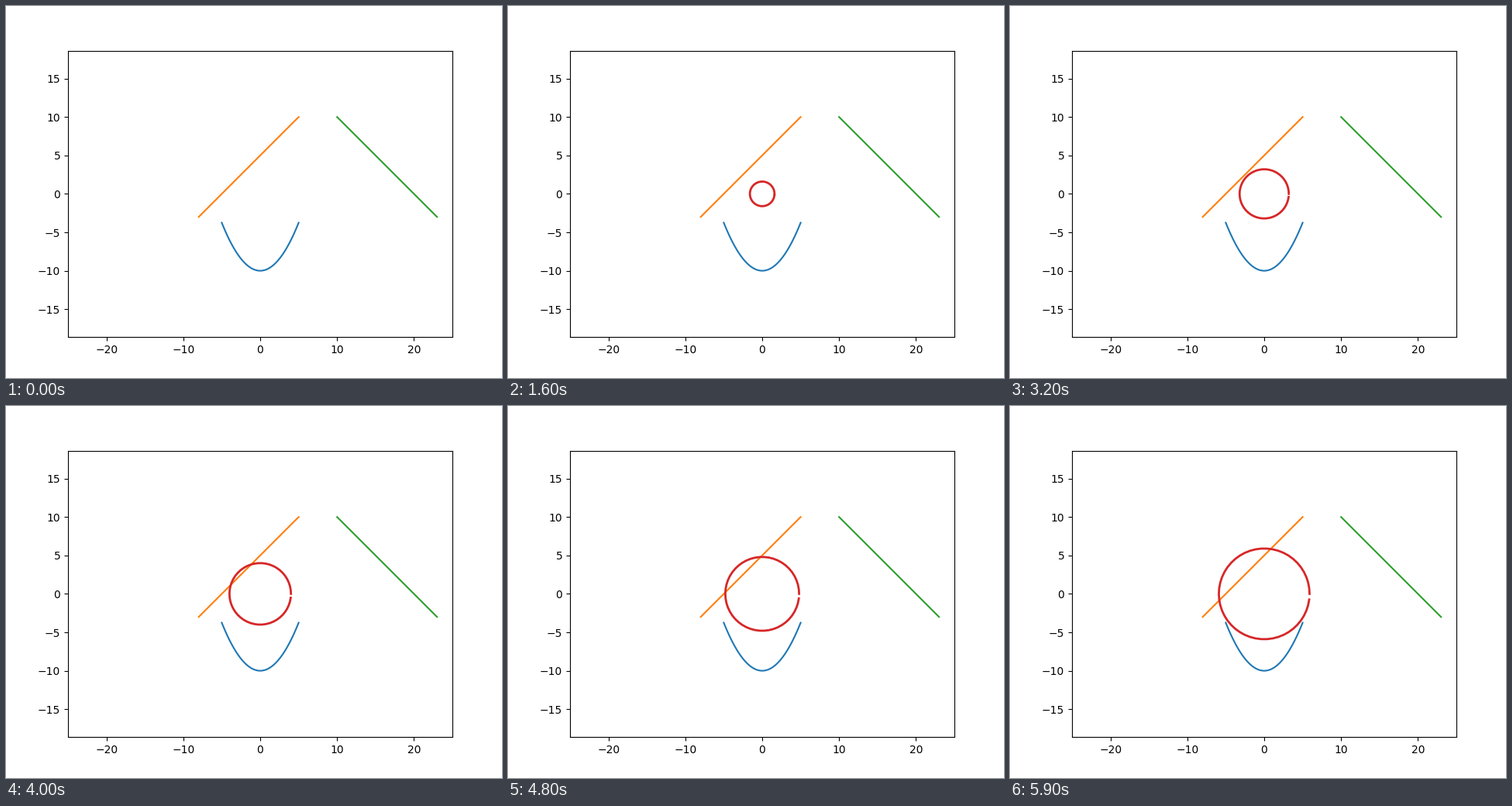
A matplotlib script for the animation above (6 s loop, 640 px wide and 480 px high).

```python
import numpy as np
import matplotlib.pyplot as plt
from matplotlib.animation import FuncAnimation

FRAMES = 60
INTERVAL = 100
GROWTH = 0.1  # radius gained per frame
HALF_WIDTH = 25

fig, ax = plt.subplots(figsize=(6.4, 4.8), dpi=100)

# Same scale on both axes
box = ax.get_position()
half_height = HALF_WIDTH * (box.height * 4.8) / (box.width * 6.4)
ax.set_xlim(-HALF_WIDTH, HALF_WIDTH)
ax.set_ylim(-half_height, half_height)

x = np.linspace(-5, 5, 100)
ax.plot(x, x**2 / 4 - 10, color="C0")

x = np.linspace(-8, 5, 100)
ax.plot(x, x + 5, color="C1")

x = np.linspace(10, 23, 100)
ax.plot(x, 20 - x, color="C2")

# The wave front stays open by one step at angle zero
angles = np.linspace(0, 2 * np.pi, 50, endpoint=False)
front, = ax.plot([], [], color="C3", lw=2)


def update(frame):
    radius = GROWTH * frame
    front.set_data(radius * np.cos(angles), radius * np.sin(angles))
    front.set_visible(frame > 0)
    return front,


anim = FuncAnimation(fig, update, frames=FRAMES, interval=INTERVAL,
                     repeat=True, repeat_delay=0)
plt.show()
```
